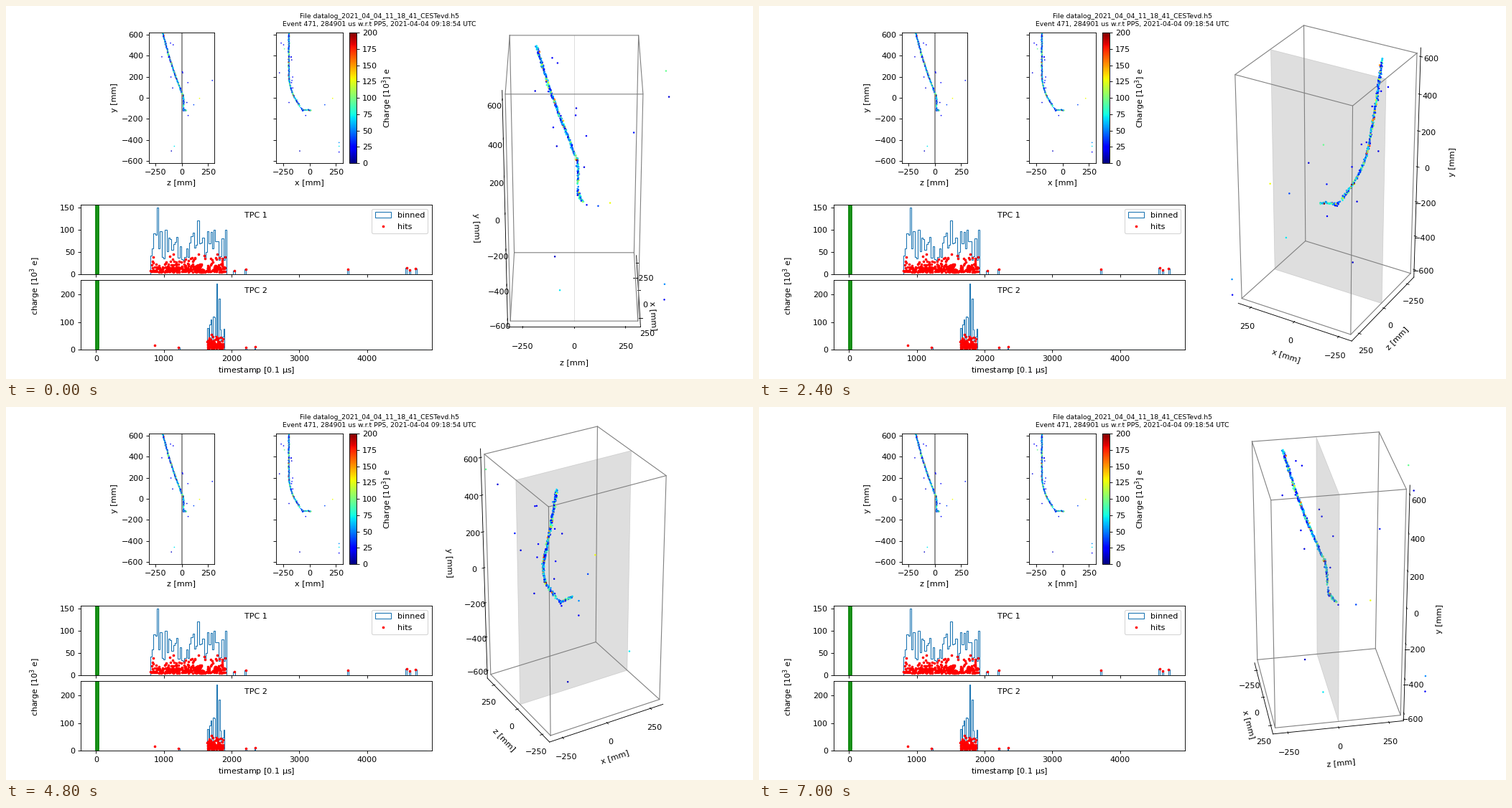
Recreate the animation shown at these times as a matplotlib script. Size 1040x520 px, loop 7.2 s.

```python
import numpy as np
import matplotlib.pyplot as plt
from matplotlib.animation import FuncAnimation
from mpl_toolkits.mplot3d.art3d import Poly3DCollection

W, H, DPI = 1040, 520, 80
FRAMES, INTERVAL = 36, 200
HALF_XZ, HALF_Y = 310, 620
AXIS_PAD = 25 / 24  # axis lines sit slightly outside the detector box
XZ_TICKS = [-250, 0, 250]
Y_TICKS = np.arange(-600, 601, 200)
CHARGE = dict(cmap="jet", vmin=0, vmax=200, linewidths=0)

plt.rcParams.update({"font.family": "DejaVu Sans", "font.size": 10})
rng = np.random.default_rng(471)
fig = plt.figure(figsize=(W / DPI, H / DPI), dpi=DPI, facecolor="white")


def add_axes(left, top, right, bottom, **kwargs):
    """Axes from pixel edges measured from the top left of the stage."""
    rect = [left / W, 1 - bottom / H, (right - left) / W, (bottom - top) / H]
    return fig.add_axes(rect, **kwargs)


def make_track():
    """Nearly straight descent that bends in x, then a short flat tail."""
    y = np.linspace(617, -118, 340)
    y = y[(y < -95) | (y > -78)]
    drop = 617 - y
    z = np.minimum(-178 + 0.232 * drop + 0.00015 * drop**2, 19)
    x = -195 + 0.00116 * np.maximum(220 - y, 0) ** 2
    u = np.linspace(0, 1, 40)
    tail = [-64 + 79 * u, 22 + 20 * u**2, -122 + 9 * np.sin(np.pi * u)]
    track = np.hstack([[x, z, y], tail])
    return track + rng.normal(0, 2.6, track.shape)


def make_hits():
    """Track, hits close to it and far strays: x, z, y, charge."""
    track = make_track()
    near = track[:, 30:360:30] + rng.normal(0, 40, (3, 11))
    # strays in order of rising charge
    strays = np.array([
        (-92, -97, -505), (-168, 457, 360), (280, 437, -515),
        (-166, 291, 165), (145, 115, -66), (280, 436, -425),
        (280, -69, -460), (-237, 443, 465), (219, 170, -5)]).T
    charge = np.concatenate([
        14 + rng.gamma(1.7, 28, track.shape[1]),
        rng.uniform(16, 28, near.shape[1]),
        np.geomspace(12, 128, strays.shape[1])])
    return *np.hstack([track, near, strays]), charge


def setup_projection(ax, u, y, charge, half, label):
    ax.scatter(u, y, c=charge, s=2.2, **CHARGE)
    ax.set(xlim=(-half, half), ylim=(-HALF_Y, HALF_Y), xticks=XZ_TICKS,
           yticks=Y_TICKS, xlabel=f"{label} [mm]")


def draw_tpc(ax, title, span, width, levels, peaks, spread, count, stray_t,
             ymax, yticks):
    """Binned charge and single hits of one cluster, plus stray hits."""
    centers = np.arange(*span, width) + width / 2
    heights = rng.uniform(*levels, len(centers))
    for t, q in peaks.items():
        heights[np.argmin(abs(centers - t))] = q
    stray_q = rng.uniform(6, 20, len(stray_t))
    ax.hist(np.append(centers, stray_t), weights=np.append(heights, stray_q),
            bins=np.arange(span[0] - 45 * width, 4900, width),
            histtype="step", lw=1, color="tab:blue", label="binned")
    hit_t = rng.uniform(*span, count)
    hit_q = np.minimum(5 + rng.exponential(spread, count), 5 * spread)
    ax.plot(np.append(hit_t, stray_t), np.append(hit_q, stray_q), "r.",
            ms=4.5, label="hits")
    ax.axvspan(0, 42, fc="#1f971f", ec="g", lw=1.5, zorder=2.2)
    ax.text(0.498, 0.815, title, transform=ax.transAxes, ha="center")
    ax.set(xlim=(-228, 4960), ylim=(0, ymax), yticks=yticks,
           xticks=range(0, 4001, 1000))


def draw_detector(ax):
    """Box edges and the cathode plane at z = 0."""
    a, h = HALF_XZ, HALF_Y
    ring = np.array([(-a, -a), (a, -a), (a, a), (-a, a), (-a, -a)])
    for y in (-h, h):
        ax.plot(ring[:, 0], ring[:, 1], y, color="gray", lw=1)
    for x, z in ring[:4]:
        ax.plot([x, x], [z, z], [-h, h], color="gray", lw=1)
    gray = (0.5, 0.5, 0.5, 0.26)
    plane = [(-a, 0, -h), (a, 0, -h), (a, 0, h), (-a, 0, h)]
    ax.add_collection3d(Poly3DCollection([plane], facecolors=[gray],
                                         edgecolors=[gray], linewidths=0.7))


x, z, y, charge = make_hits()

fig.suptitle("File datalog_2021_04_04_11_18_41_CESTevd.h5\n"
             "Event 471, 284901 us w.r.t PPS, 2021-04-04 09:18:54 UTC",
             fontsize="small")

ax_zy = add_axes(199, 37, 290, 219)
setup_projection(ax_zy, z, y, charge, HALF_XZ, "z")
ax_zy.axvline(0, color="gray", lw=1.5, zorder=0.9)
ax_zy.set_ylabel("y [mm]")

ax_xy = add_axes(376, 37, 469, 219)
setup_projection(ax_xy, x, y, charge, 316, "x")
ax_xy.set_yticklabels([])

ax_bar = add_axes(478, 37, 488, 219)
fig.colorbar(ax_xy.collections[0], cax=ax_bar, ticks=range(0, 201, 25),
             label="Charge [$10^3$] e")

ax_tpc1 = add_axes(104, 277, 593, 374)
draw_tpc(ax_tpc1, "TPC 1", (800, 1915), 24, levels=(30, 102),
         peaks={910: 150, 1520: 120}, spread=9, count=310,
         stray_t=[2040, 2215, 3720, 4590, 4635, 4715],
         ymax=156, yticks=[0, 50, 100, 150])
ax_tpc1.legend(loc="upper right")

ax_tpc2 = add_axes(104, 382, 593, 479)
draw_tpc(ax_tpc2, "TPC 2", (1640, 1890), 17, levels=(20, 125),
         peaks={1793: 240, 1827: 185}, spread=13, count=120,
         stray_t=[865, 1220, 2215, 2345],
         ymax=253, yticks=[0, 100, 200])
ax_tpc2.set_xlabel(r"timestamp [0.1 $\mathrm{\mu}$s]")
fig.text(41 / W, 1 - 390 / H, "charge [10$^3$ e]", rotation=90,
         ha="center", va="center")

ax3d = add_axes(564, 26, 1006, 468, projection="3d")
ax3d.patch.set_visible(False)
draw_detector(ax3d)
ax3d.scatter(x, z, y, c=charge, s=5, depthshade=False, **CHARGE)
ax3d.grid(False)
for axis in (ax3d.xaxis, ax3d.yaxis, ax3d.zaxis):
    axis.set_pane_color((1, 1, 1, 0))
side, height = HALF_XZ * AXIS_PAD, HALF_Y * AXIS_PAD
ax3d.set(xlim=(-side, side), ylim=(-side, side), zlim=(-height, height),
         xticks=XZ_TICKS, yticks=XZ_TICKS, zticks=Y_TICKS,
         xlabel="x [mm]", ylabel="z [mm]")
ax3d.set_zlabel("y [mm]", labelpad=20)
ax3d.set_box_aspect((1, 1, 2))


def update(i):
    # tiny offset keeps the axis sides well defined at right angles
    ax3d.view_init(elev=30, azim=360 * i / FRAMES + 1e-6)
    return []


anim = FuncAnimation(fig, update, frames=FRAMES, interval=INTERVAL, repeat=True)
plt.show()
```
